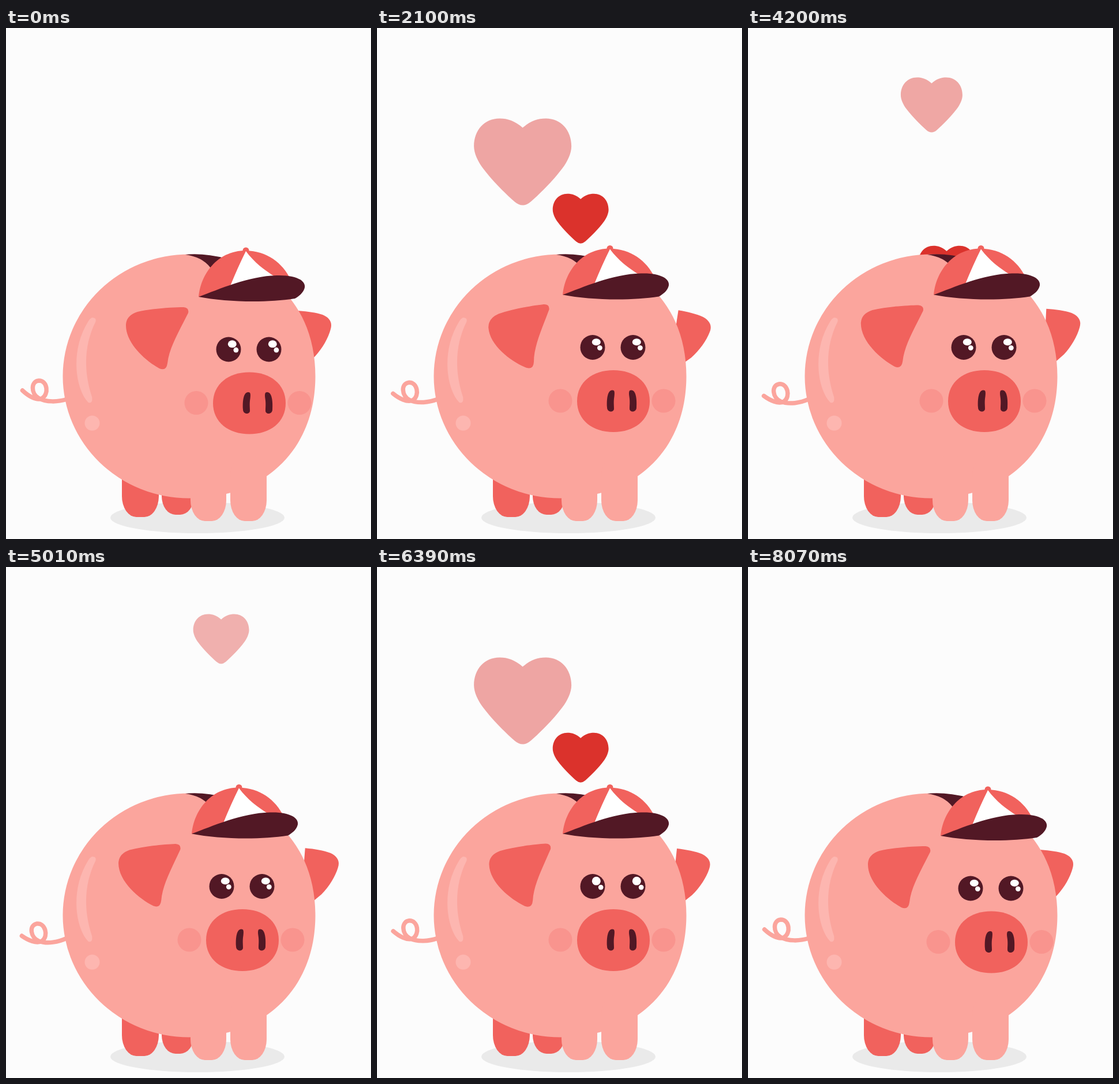
Write an HTML page that moves like this. It is 633x884 px and loops after 8100 ms.

```html
<!DOCTYPE html>
<html lang="en">
<head>
<meta charset="utf-8">
<title>Piggy bank</title>
<style>
  html, body { margin: 0; width: 100%; height: 100%; overflow: hidden; background: #fcfcfc; }
  svg { display: block; width: 100%; height: 100%; }
  .pink { fill: #fba59d; }
  .red { fill: #f1625d; }
  .dark { fill: #521825; }
  .shine { fill: #fdb6b0; }
  .cheek { fill: #f9948e; }
  .white { fill: #fff; }
</style>
</head>
<body>
<svg viewBox="0 0 633 884">
  <defs>
    <path id="heart" fill="#db322c" d="M0 16C-14 4-26 0-40 0C-66 0-84.5 20-84.5 48C-84.5 60-78 74-69 86C-54 106-30 130-14 144Q0 156 14 144C30 130 54 106 69 86C78 74 84.5 60 84.5 48C84.5 20 66 0 40 0C26 0 14 4 0 16Z"/>
    <path id="nostril" class="dark" d="M420 630C424 630 424.500 633 423.500 641C422 650 423 656 423 662C423 669 411 669 411 660C410 645 412 630 420 630Z"/>
    <g id="eye">
      <circle class="dark" cx="386" cy="556" r="21.500"/>
      <ellipse class="white big" cx="392.300" cy="546.700" rx="7.500"/>
      <circle class="white small" r="4.400"/>
    </g>
  </defs>

  <ellipse cx="332" cy="847" rx="151" ry="27" fill="#eaeaea"/>
  <g id="hearts"></g>
  <g transform="matrix(-1 0 0 1 772 0)">
    <path class="red flap" d="M267 489C250 490 235 492 223 496C209 502 206 511 209 521C213 536 223 554 236 568L272 600Z"/>
  </g>
  <path id="tail" fill="none" stroke="#fba59d" stroke-width="7.500" stroke-linecap="round"
    d="M28.500 627C38 636 52 645 62 641C75 634 72 610 57 610C43 611 43 632 56 640C70 648 90 647 106 642"/>
  <rect class="red" x="270" y="740" width="56" height="102" rx="24" ry="32"/>
  <rect class="red" x="201" y="740" width="64" height="106" rx="25" ry="36"/>
  <path class="pink" d="M317.500 391.500C449 391.500 536.500 476 536.500 602.500S449 813.500 317.500 813.500A219 211 0 0 1 317.500 391.500Z"/>
  <rect class="pink" x="320" y="740" width="62" height="113" rx="25" ry="36"/>
  <rect class="pink" x="389" y="740" width="63" height="113" rx="25" ry="36"/>
  <path class="shine" d="M149 501Q158 501 155 509C137 545 133 590 149 638Q151 650 143 648C120 625 110 555 145 504Z"/>
  <circle class="shine" cx="149.500" cy="683.500" r="13"/>
  <path class="dark" d="M311 392Q345 389 382 399L365 427L354 414Q340 396 311 392Z"/>
  <path class="red flap" d="M308 483Q318 484 316 493C300 525 283 553 280 580Q278 594 266 589C242 576 207 545 208 513Q209 497 228 491C255 485 290 483 308 483Z"/>

  <g id="face">
    <path class="red" d="M334 465C337 428 365 385 416 385C452 386 479 405 494 436Z"/>
    <circle class="red" cx="416" cy="385" r="5.500"/>
    <path class="white" d="M416 386Q402 414 389 446L468 431C448 419 430 405 416 386Z"/>
    <path class="dark" d="M334 465C370 452 420 429 470 428C505 427 520 438 518 449C516 458 508 464 501 468C450 476 380 474 334 465Z"/>
    <use href="#eye"/>
    <use href="#eye" x="70"/>
    <circle class="cheek" cx="330" cy="648.500" r="20.500"/>
    <circle class="cheek" cx="509" cy="648.500" r="20.500"/>
    <path class="red" d="M359 649C359 616 386 595.500 422 595.500S485 616 485 649S458 702.500 422 702.500S359 682 359 649Z"/>
    <use href="#nostril"/>
    <use href="#nostril" transform="matrix(-1 0 0 1 873 0)"/>
  </g>
</svg>
<script>
const LOOP = 8100, SPEED = 0.3645, FADE = 171, REF = 200, GROW_FROM = 540, GROW_TO = 420;

// Each lane: size, top where it vanishes, x at REF height, sideways drift per pixel
const lanes = {
  mid:   { size: 0.633, end: 13, x: 325.4, drift: 0.061 },
  small: { size: 0.573, end: 17, x: 361.6, drift: -0.097 },
  left:  { size: 1,     end: 83, x: 245.4, drift: -0.167 },
  inner: { size: 1,     end: 83, x: 276,   drift: -0.33 },
  right: { size: 1,     end: 83, x: 451,   drift: 0.073 }
};
// Times at which hearts pass the REF height
const burst = [['mid', 1278], ['left', 1982], ['small', 2339], ['right', 2882], ['inner', 3334]];
const schedule = [
  ...burst, ['mid', 3887], ['small', 4686],
  ...burst.map(([lane, at]) => [lane, at + 4290])
];

const $ = s => document.querySelector(s);
const clamp = v => Math.max(0, Math.min(1, v));
const smooth = v => { v = clamp(v); return v * v * (3 - 2 * v); };
const set = (el, attrs) => { for (const k in attrs) el.setAttribute(k, attrs[k]); };

// Swings 0..1..0 with the given period, resting outside the time span
const swing = (t, from, to, period) =>
  t < from || t > to ? 0 : Math.sin(Math.PI * (t - from) / period) ** 2;

const hearts = schedule.map(([lane, at]) => {
  const el = document.createElementNS('http://www.w3.org/2000/svg', 'use');
  set(el, { href: '#heart' });
  $('#hearts').append(el);
  return { el, at, ...lanes[lane] };
});
const flaps = document.querySelectorAll('.flap');

function drawHeart({ el, at, size, end, x, drift }, t) {
  const top = REF - (t - at) * SPEED;
  const grow = clamp((GROW_FROM - top) / (GROW_FROM - GROW_TO));
  const cx = x + (top - REF) * drift, mid = top + 75 * size, s = size * grow;
  set(el, {
    transform: `translate(${cx} ${mid}) scale(${s}) translate(0 -75)`,
    opacity: grow ? clamp((top - end) / FADE) : 0
  });
}

function draw(t) {
  hearts.forEach(h => drawHeart(h, t));

  const turn = smooth((t - 60) / 780) - smooth((t - 7170) / 800);
  const shift = `translate(${-12 * turn} ${-3.5 * turn})`;
  const flap = -6.5 * swing(t, 862, 7582, 280);
  set($('#face'), { transform: shift });
  flaps.forEach(el => set(el, { transform: `${shift} rotate(${flap} 290 543)` }));

  set($('#tail'), { transform: `rotate(${-9 * swing(t, 156, 7986, 870)} 103 640)` });

  const sparkle = clamp(2 * Math.cos(2 * Math.PI * (t - 3085) / 3995));
  set($('.big'), { ry: 6 + 1.5 * sparkle });
  set($('.small'), { cx: 398.3 + 2 * sparkle, cy: 556.8 + 0.8 * sparkle });
}

const start = performance.now();
function frame() {
  draw((performance.now() - start) % LOOP);
  requestAnimationFrame(frame);
}
frame();
</script>
</body>
</html>
```
